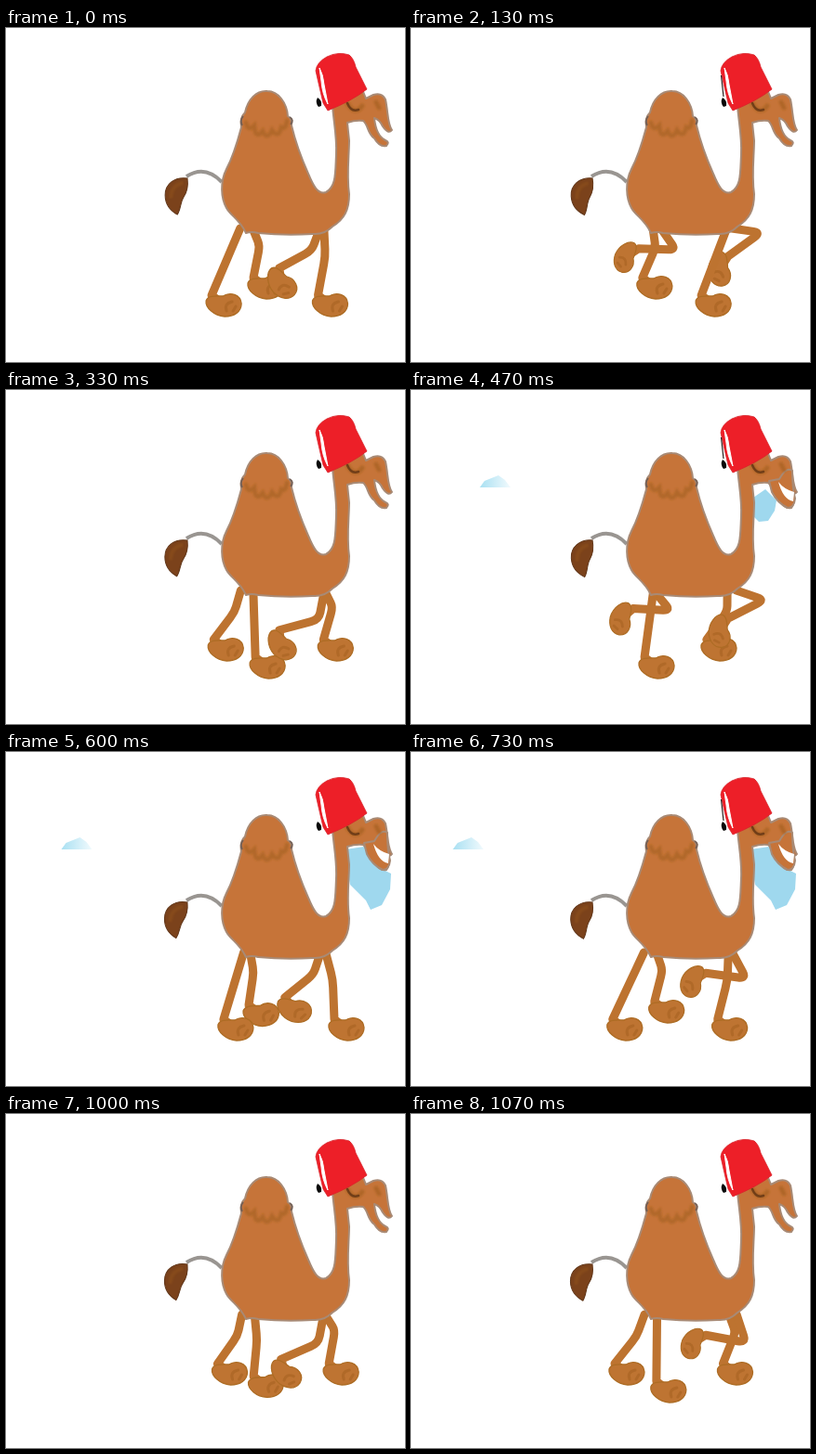
Write an HTML page that moves like this. It is 429 px wide and 360 px high and loops after 1.11 s.

```html
<!DOCTYPE html>
<html lang="en">
<head>
<meta charset="utf-8">
<title>Walking camel</title>
<style>
html, body { margin: 0; width: 100%; height: 100%; overflow: hidden; background: #fff; }
svg { display: block; width: 429px; height: 360px; }
.leg path { fill: none; stroke: #bd7330; stroke-width: 9; stroke-linecap: round; stroke-linejoin: round; }
.leg .foot { fill: #be7432; stroke: #ad6c24; stroke-width: 1.3; }
.leg .crease { stroke: #9a5a18; stroke-width: 3; opacity: .4; }
.skin { fill: #c67439; stroke: #a88a75; stroke-width: 2; stroke-linejoin: round; }
.mark { fill: none; stroke: #a3601e; stroke-linecap: round; }
</style>
</head>
<body>
<svg viewBox="0 0 429 360">
  <defs>
    <linearGradient id="mist">
      <stop offset="0" stop-color="#a9e0f2"/>
      <stop offset="1" stop-color="#f1fafd"/>
    </linearGradient>
    <filter id="soft"><feGaussianBlur stdDeviation="1.3"/></filter>
  </defs>

  <path id="cloud" fill="url(#mist)" d="M0 31L5 24L20 18L27 23L33 31Z"/>
  <path id="sky" fill="#9fd8ee"/>
  <g id="legs"></g>

  <path d="M232 166Q214 147 194 160" fill="none" stroke="#999591" stroke-width="4"/>
  <g id="tuft">
    <path d="M195 162C196 170 195 176 191 182C187 188 188 195 184 201C177 197 171 190 171 180C171 168 181 160 195 162Z" fill="#7b421b" stroke="#62371a"/>
    <path d="M189 167Q178 170 177 182" class="mark" stroke-width="4" opacity=".3" filter="url(#soft)"/>
  </g>

  <path class="skin" d="M281 68C269 67 260 77 257 91C252 96 252 101 253 107C249 122 244 139 237 152C230 166 231 183 237 194C242 203 251 206 258 221
    Q264 219 271 221Q300 224 330 222Q342 223 351 214C364 206 369 196 369 179C366 158 369 137 369 121Q368 112 367 102
    Q376 99 384 100C390 105 388 113 396 119Q402 129 409 127Q413 123 408 121C400 117 397 107 396 97
    Q402 99 405 106Q411 115 415 110C410 103 411 91 408 77Q404 69 395 72L387 76L383 66L351 83
    C352 100 356 117 355 136C354 157 355 171 344 177C335 180 330 169 325 157C317 139 311 122 307 105Q308 98 303 95C302 81 293 68 281 68Z"/>
  <g id="grin">
    <path class="skin" d="M385 98L396 96Q404 82 410 87Q410 106 413 117Q412 127 405 127Q394 122 388 110Z" stroke="none"/>
    <path d="M395 99Q401 107 412 110L411 120Q400 118 395 99Z" fill="#fff"/>
  </g>

  <g filter="url(#soft)">
    <path class="mark" d="M258 102Q260 112 267 105Q268 121 276 111Q281 122 286 110Q293 120 296 107Q301 110 302 100" stroke-width="4.5" opacity=".6"/>
    <path class="mark" d="M367 81Q375 95 383 84M398 80L401 86" stroke-width="5" opacity=".65"/>
  </g>
  <path class="mark" d="M367 81Q371 91 379 88" style="stroke:#713e18" stroke-width="2.5"/>
  <path d="M255 95Q251 100 254 105M305 96Q310 99 306 104" fill="none" stroke="#756157" stroke-width="2"/>

  <path d="M333 46Q334 37 345 31Q357 25 369 29Q374 33 376 42L388 66Q373 78 346 89L341 81Q337 64 333 46Z" fill="#ed1f28" stroke="#d9232a" stroke-width=".8"/>
  <path d="M337 43Q341 50 342 61L346 82Q340 71 339 57Z" fill="#fff" stroke="#fff"/>
  <path id="cord" d="M333.5 51L336 74" fill="none" stroke="#292020" stroke-width="1.2"/>
  <path d="M335 75Q340 78 339 84L336 85Q332 80 335 75Z" fill="#080808"/>
</svg>

<script>
const LOOP = 1110, STEPS = 17, STRIDE = 10.5;
const $ = id => document.getElementById(id);
const mix = (a, b, k) => a + (b - a) * k;

// Foot path from touchdown: time, x, y (null = on the ground), angle
const REAR = {
  hip: 258, mid: 255, sway: .3, rise: .35, thigh: 28, shin: 40,
  path: [[0, 282, null, 0], [6.2, 229, null, 0], [7.5, 226, 242, 115], [8.1, 256, 270, 80], [9.4, 275, 283, -5]]
};
const FRONT = {
  hip: 341, mid: 340, sway: .1, rise: .25, thigh: 32, shin: 44,
  path: [[0, 366, null, 0], [4.2, 317, null, 0], [6.5, 296, 275, 45], [7, 303, 247, 110],
    [8.5, 332, 260, 85], [9, 396, 252, -50], [9.8, 408, 264, -25]]
};
const HIP_Y = 216;

const FOOT = 'M-19-4C-17-10-8-9-1-9C7-14 18-11 19-1C19 8 11 13 1 13C-11 12-20 3-19-4Z';
const SKY = {
  rising: 'M368 116L381 107L393 119L391 130L384 141L374 142L368 136Z',
  full: 'M365 105L385 102L400 124L414 131L413 148L404 165L392 170L387 160L370 143L367 126Z',
  fading: 'M369 124L381 109L395 122L407 130L402 142L388 151L371 138Z'
};

const show = (el, on) => { el.style.display = on ? '' : 'none'; };

function footAt(path, time, ground) {
  const next = path.findIndex(key => key[0] > time);
  const a = path.at(next < 0 ? -1 : next - 1);
  const b = next < 0 ? [STRIDE, ...path[0].slice(1)] : path[next];
  const k = (time - a[0]) / (b[0] - a[0]);
  return [mix(a[1], b[1], k), mix(a[2] ?? ground, b[2] ?? ground, k), mix(a[3], b[3], k)];
}

// Two-bone joint; a standing leg stays almost straight.
function kneeAt(hx, ax, ay, lift, { thigh, shin }) {
  const dx = ax - hx, dy = ay - HIP_Y, d = Math.hypot(dx, dy);
  const along = Math.min(thigh, (thigh ** 2 - shin ** 2 + d * d) / (2 * d));
  const bend = dx > 12 ? -.15 : Math.min(1, .35 + lift / 30);
  const out = Math.sqrt(thigh ** 2 - along ** 2) * bend;
  return [hx + (dx * along + dy * out) / d, HIP_Y + (dy * along - dx * out) / d];
}

function makeLeg([kind, offset, ground]) {
  const g = document.createElementNS('http://www.w3.org/2000/svg', 'g');
  g.setAttribute('class', 'leg');
  g.innerHTML = `<path/><g><path class="foot" d="${FOOT}"/><path class="crease" d="M3 7Q0-1 9-3M10 7L13 2"/></g>`;
  $('legs').append(g);
  const [limb, foot] = g.children;
  return phase => {
    const [x, y, angle] = footAt(kind.path, (phase + offset) % STRIDE, ground);
    const lift = ground - y, r = angle * Math.PI / 180;
    const hx = kind.hip + (x - kind.mid) * kind.sway + lift * kind.rise;
    const ax = x - 13 * Math.cos(r) + 10 * Math.sin(r);
    const ay = y - 13 * Math.sin(r) - 10 * Math.cos(r);
    const [kx, ky] = kneeAt(hx, ax, ay, lift, kind);
    const p = [mix(hx, kx, .75), mix(HIP_Y, ky, .75)], q = [mix(kx, ax, .2), mix(ky, ay, .2)];
    limb.setAttribute('d', `M${hx} ${HIP_Y}L${p}Q${kx} ${ky} ${q}L${ax} ${ay}L${x} ${y}`);
    foot.setAttribute('transform', `translate(${x} ${y}) rotate(${angle}) scale(${1 - lift * .002})`);
  };
}

const legs = [[REAR, .35, 279], [FRONT, 6.5, 279], [REAR, 5.6, 298], [FRONT, 1.5, 298]].map(makeLeg);

function draw(step) {
  const phase = step % STRIDE;
  legs.forEach(leg => leg(phase));

  const sway = Math.cos((phase - 1.5) * 4 * Math.PI / STRIDE);
  $('tuft').setAttribute('transform', `rotate(${-1 - 3 * sway} 194 161)`);
  show($('cord'), sway > .2);

  show($('cloud'), step >= 6 && step <= 12);
  $('cloud').setAttribute('transform', `translate(${74 - 7.25 * (step - 7)} 74)`);

  const patch = step >= 6 && step <= 14;
  show($('sky'), patch);
  show($('grin'), patch);
  $('sky').setAttribute('d', SKY[step < 8 ? 'rising' : step < 13 ? 'full' : 'fading']);
}

let start;
function tick(now) {
  start ??= now;
  const t = (now - start) % LOOP;
  let step = STEPS - 1;
  while (step && Math.round(step * 20 / 3) * 10 > t) step--;
  draw(step);
  requestAnimationFrame(tick);
}
draw(0);
requestAnimationFrame(tick);
</script>
</body>
</html>
```
